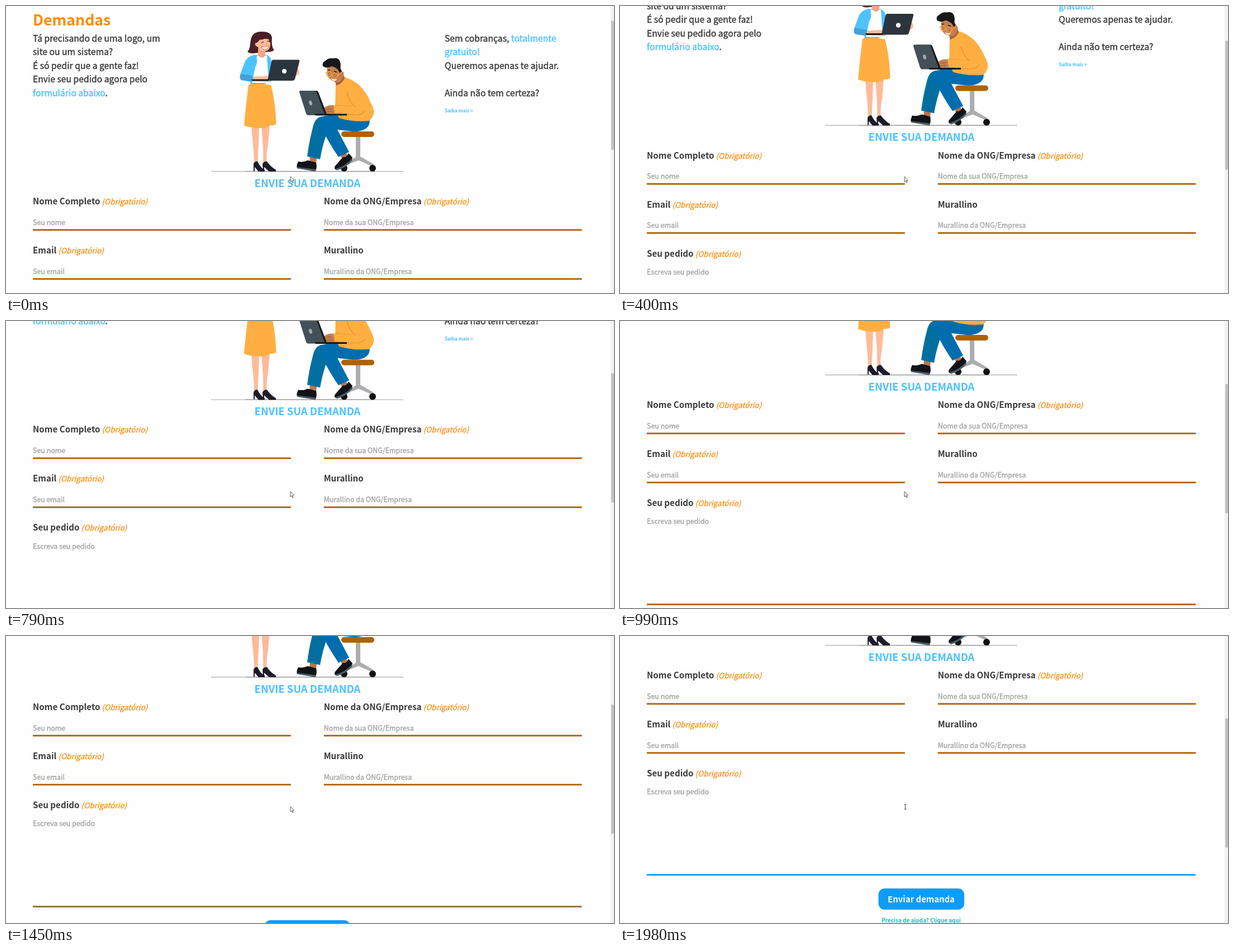
Recreate the animation shown at these times as an HTML page. Size 1088 px wide and 515 px high, loop 3.37 s.

```html
<!DOCTYPE html>
<html lang="pt-BR">
<head>
<meta charset="utf-8">
<title>Demandas</title>
<style>
  html, body { margin: 0; width: 100%; height: 100%; overflow: hidden; background: #fefefe; }
  svg { display: block; width: 100%; height: 100%; }
  text { font-family: "Noto Sans CJK JP", "Noto Sans CJK SC", "Noto Sans CJK", "Noto Sans", sans-serif; white-space: pre; }
  .body { font-size: 15.69px; fill: #3a3a3c; stroke: #3a3a3c; stroke-width: .42px; }
  .blue { fill: #4cc0ff; stroke: #4cc0ff; }
  .bold { font-weight: 700; }
  .label { font-size: 15.17px; font-weight: 700; fill: #3a3a3c; }
  .req { font-size: 13.55px; font-weight: 400; font-style: italic; fill: #f98c0a; stroke: #f98c0a; stroke-width: .25px; }
  .hint { font-size: 12.45px; fill: #a5a5a5; stroke: #a5a5a5; stroke-width: .38px; }
  .mid { text-anchor: middle; font-weight: 700; }
</style>
</head>
<body>
<svg viewBox="0 0 1088 515">
  <g id="page">
    <text class="bold" x="48" y="34.5" font-size="26.7" fill="#fb8c00">Demandas</text>
    <g id="copy"></g>
    <text class="bold" x="785" y="190.7" font-size="8.3" fill="#4cc0ff">Saiba mais &gt;</text>

    <path d="M367 296.7H711" stroke="#b9b9bb" stroke-width="1.4"/>
    <path d="M428 296.7H660" stroke="#8f8f93" stroke-width="1"/>

    <g id="woman">
      <path d="M432 82C438 77 436 66 439 57C442 48 450 46 458 46C468 46 475 49 476 57C475 66 476 75 480 79C476 83 468 82 461 83L442 85Q435 85 432 82Z" fill="#4a1f27"/>
      <path d="M439 214L453 216L452 250Q450 268 451 286L444 287Q444 260 441 240Z" fill="#ffba98"/>
      <path d="M457 215L472 214L469 248Q465 268 467 286L460 288Q461 262 459 240Z" fill="#ffba98"/>
      <path d="M443 296V283Q446 278 450 279Q456 291 463 294V297H452L445 289V296Z" fill="#1d1b2a"/>
      <path d="M460 296L459 283Q463 278 467 279Q474 289 483 294V297H471L462 289V296Z" fill="#1d1b2a"/>
      <path d="M443 88Q455 87 467 88Q474 91 475 100V135L436 150Q440 120 439 92Z" fill="#4cc3ff"/>
      <path d="M449 89H467L470 138H440Q446 113 449 89Z" fill="#fff"/>
      <path d="M451 76H464V89Q459 96 451 89Z" fill="#f5a482"/>
      <path d="M450 60Q460 62 466 56Q472 60 473 68Q473 80 464 81Q454 81 450 73Q445 72 446 67Z" fill="#ffba98"/>
      <path d="M447 67Q453 64 456 56Q462 60 473 59V53Q463 47 451 50Q443 55 447 67Z" fill="#4a1f27"/>
      <path d="M457 66Q459 64 461 65M468 64Q470 62 472 64" stroke="#4a1f27" stroke-width="1.2" fill="none"/>
      <path d="M465 65L468 70H465" stroke="#ee936f" fill="none"/>
      <path d="M457 73Q464 75 470 71Q469 78 464 78Q459 78 457 73Z" fill="#fff" stroke="#c9503f" stroke-width=".8"/>
      <path d="M434 141Q454 138 474 142Q482 170 483.5 212Q479 215 473 214Q464 220 455 219Q439 219 426 214.5Q429 178 434 141Z" fill="#ffae42"/>
      <path d="M438 127L473 125L480 131L469 136L438 135Z" fill="#ffba98"/>
      <path d="M443 88Q432 91 428 99L419 123Q417 130 421 133L441 136L443 126L438 123L448 106Q452 94 443 88Z" fill="#4cc3ff"/>
      <path d="M420 122L441 125L440 136L422 133Q417 130 420 122Z" fill="#469fd5"/>
      <path d="M514 111Q521 109 524 115Q527 123 518 126L513 124Z" fill="#ffba98"/>
      <path d="M478 96.5H523Q526 96.5 525 100L517 131Q516 134 512 134H468L475 100Q476 96.5 478 96.5Z" fill="#2c343e"/>
      <path d="M439 131.5H470V134.5H441Z" fill="#17191f"/>
      <circle cx="498" cy="117" r="4.2" fill="#fff"/>
    </g>

    <g id="man">
      <path d="M626 233H634V270L658 284L656 288L631 277L607 286L603 285L626 271Z" fill="#adadb0"/>
      <circle cx="605" cy="291" r="6" fill="#111"/>
      <circle cx="656" cy="291" r="6" fill="#111"/>
      <rect x="600" y="225" width="59" height="10" rx="5" fill="#ae6200"/>
      <path d="M544 269L556 272L555 284L543 282Z" fill="#b9754a"/>
      <path d="M523 279Q532 281 540 277L555 281Q557 289 554 296L521 291Q519 287 523 279Z" fill="#121316"/>
      <path d="M521 289L554 293V297L521 291.5Z" fill="#4b5b64"/>
      <path d="M567 198Q553 199 549 218Q542 245 539 270L562 275Q567 246 576 224L590 206Z" fill="#006f9f"/>
      <path d="M599 269L609 264L614 274L604 280Z" fill="#b9754a"/>
      <path d="M603 271Q609 273 613 264L620 272Q619 279 606 288L591 294Q586 292 589 287Z" fill="#121316"/>
      <path d="M590 292Q606 288 619 274L620 277Q608 291 592 295Z" fill="#4b5b64"/>
      <path d="M562 202Q567 196 580 196L650 199Q653 213 645 219Q636 226 620 225L593 222L614 262L595 271Q578 246 565 220Q560 210 562 202Z" fill="#006dae"/>
      <path d="M588 130L603 122L609 134L592 150Z" fill="#a8643c"/>
      <path d="M575 108Q585 103 597 106L604 124Q601 137 593 137Q582 135 577 128Q573 120 575 108Z" fill="#c47e50"/>
      <path d="M567 108Q565 101 572 98Q577 93 585 94Q594 92 597 98Q600 105 598 112L603 122L600 125L594 114Q589 110 583 108Q574 113 567 108Z" fill="#17181c"/>
      <ellipse cx="601" cy="122" rx="3.4" ry="4.5" fill="#c47e50"/>
      <g fill="none" stroke="#f3a43a" stroke-width="1.4">
        <circle cx="589" cy="125" r="5"/><circle cx="578" cy="122" r="4.5"/><path d="M594 124L601 119M573 121L572 119"/>
      </g>
      <path d="M576 115L580 115M587 117L592 119" stroke="#17181c" stroke-width="1.4"/>
      <path d="M581 129Q586 133 592 131Q590 135 586 134Q582 132 581 129Z" fill="#fff"/>
      <path d="M590 143Q602 140 607 128Q620 132 631 141Q645 154 653 174Q661 189 657 196Q655 202 650 206Q622 209 596 201L589 186Z" fill="#ffae42"/>
      <path d="M610 146Q616 169 624 180L588 178V191L632 194Q640 192 636 184Z" fill="#ffae42"/>
      <path d="M610 155Q615 175 626 181L589 178M598 194L629 195Q640 194 642 188" fill="none" stroke="#d9851e" stroke-width="1"/>
      <path d="M570 182Q579 176 590 179L600 181V193L574 194L570 188Z" fill="#c47e50"/>
      <path d="M586 178L632 181L630 195L588 192Z" fill="#ffae42"/>
      <path d="M573 185L583 184M574 190L584 189" stroke="#995930"/>
      <path d="M530 152H556Q558 152 559 155L574 194L571 196L552 194Z" fill="#15181b"/>
      <path d="M527 152H553Q555 152 556 155L571 196H541Q538 196 537 193L525 155Q524 152 527 152Z" fill="#435058"/>
      <path d="M552 193.5H610V196.5H554Z" fill="#15181b"/>
      <ellipse cx="545" cy="174" rx="2.8" ry="4.5" transform="rotate(-18 545 174)" fill="#a0a9ad"/>
    </g>

    <text class="mid" x="539.5" y="324.8" font-size="18.45" fill="#4cc0ff">ENVIE SUA DEMANDA</text>
    <g id="form"></g>
    <rect id="line" x="48" y="707.2" width="982.3" height="2.8"/>
    <rect x="462.5" y="733" width="153.5" height="38" rx="11" fill="#0c9cfc"/>
    <text class="mid" x="539" y="757.5" font-size="14.9" fill="#fff">Enviar demanda</text>
    <text class="mid" x="539" y="794" font-size="9.92" fill="#12bccb">Precisa de ajuda? Clique aqui</text>
  </g>
  <rect x="1082" width="6" height="515" fill="#f1f1f1"/>
  <rect id="thumb" x="1083" width="5" height="231.5" fill="#c1c1c1"/>
  <path id="arrow" d="M509 306V315.5L511.2 313.6L512.8 317L514.2 316.3L512.7 313L515.3 312.6Z" fill="#fff" stroke="#333" stroke-width=".8"/>
  <path id="beam" d="M508.5 302H510L510.5 302.5L511 302H512.5M510.5 302.5V310.5M508.5 311H510L510.5 310.5L511 311H512.5" fill="none" stroke="#333" stroke-width="1"/>
</svg>
<script>
const $ = id => document.getElementById(id);
const clamp = v => Math.max(0, Math.min(1, v));
const blue = s => `<tspan class="blue">${s}</tspan>`;

const column = (x, lines) => lines.map((s, i) =>
  `<text class="body" x="${x}" y="${63.8 + 24.5 * i}">${s}</text>`).join('');

$('copy').innerHTML = column(48, [
  'Tá precisando de uma logo, um', 'site ou um sistema?', 'É só pedir que a gente faz!',
  'Envie seu pedido agora pelo', blue('formulário abaixo') + '.'
]) + column(785, [
  'Sem cobranças, ' + blue('totalmente'), blue('gratuito!'), 'Queremos apenas te ajudar.',
  '', 'Ainda não tem certeza?'
]);

const label = (x, y, name, required) =>
  `<text class="label" x="${x}" y="${y}">${name}${required ? '<tspan class="req"> (Obrigatório)</tspan>' : ''}</text>`;
const hint = (x, y, s) => `<text class="hint" x="${x}" y="${y}">${s}</text>`;
const field = (x, row, name, required, note) => {
  const y = 88 * row;
  return label(x, 356 + y, name, required) + hint(x, 392.8 + y, note) +
    `<rect x="${x}" y="${400.4 + y}" width="461.8" height="2.8" fill="#ae6000"/>`;
};

$('form').innerHTML =
  field(48, 0, 'Nome Completo', true, 'Seu nome') +
  field(568.7, 0, 'Nome da ONG/Empresa', true, 'Nome da sua ONG/Empresa') +
  field(48, 1, 'Email', true, 'Seu email') +
  field(568.7, 1, 'Murallino', false, 'Murallino da ONG/Empresa') +
  label(48, 532, 'Seu pedido', true) + hint(48, 564.2, 'Escreva seu pedido');

// Scroll stops: [tick, offset]
const LOOP = 3370, TICK = 66;
const stops = [[0, 0], [3, 52], [4, 52], [6, 82.5], [8, 112], [9, 112], [10, 126],
  [15, 200], [17, 223], [22, 223], [30, 280], [60, 280]];
const from = [174, 96, 0], to = [12, 156, 252];

function scrollAt(tick) {
  const i = stops.findIndex(s => s[0] > tick);
  const [a, b] = [stops[i - 1], stops[i]];
  return a[1] + (b[1] - a[1]) * (tick - a[0]) / (b[0] - a[0]);
}

function draw(now) {
  const tick = Math.floor((now % LOOP + 2) / TICK);
  const y = scrollAt(tick);
  const hover = clamp((tick - 21) / 5);
  $('page').setAttribute('transform', `translate(0 ${-y})`);
  $('thumb').setAttribute('y', 26.5 + y * .434);
  $('line').setAttribute('fill', `rgb(${from.map((c, i) => Math.round(c + (to[i] - c) * hover))})`);
  const typing = tick >= 23;
  $('arrow').style.display = typing ? 'none' : '';
  $('beam').style.display = typing ? '' : 'none';
}

const start = performance.now();
function loop() {
  draw(performance.now() - start);
  requestAnimationFrame(loop);
}
loop();
</script>
</body>
</html>
```
